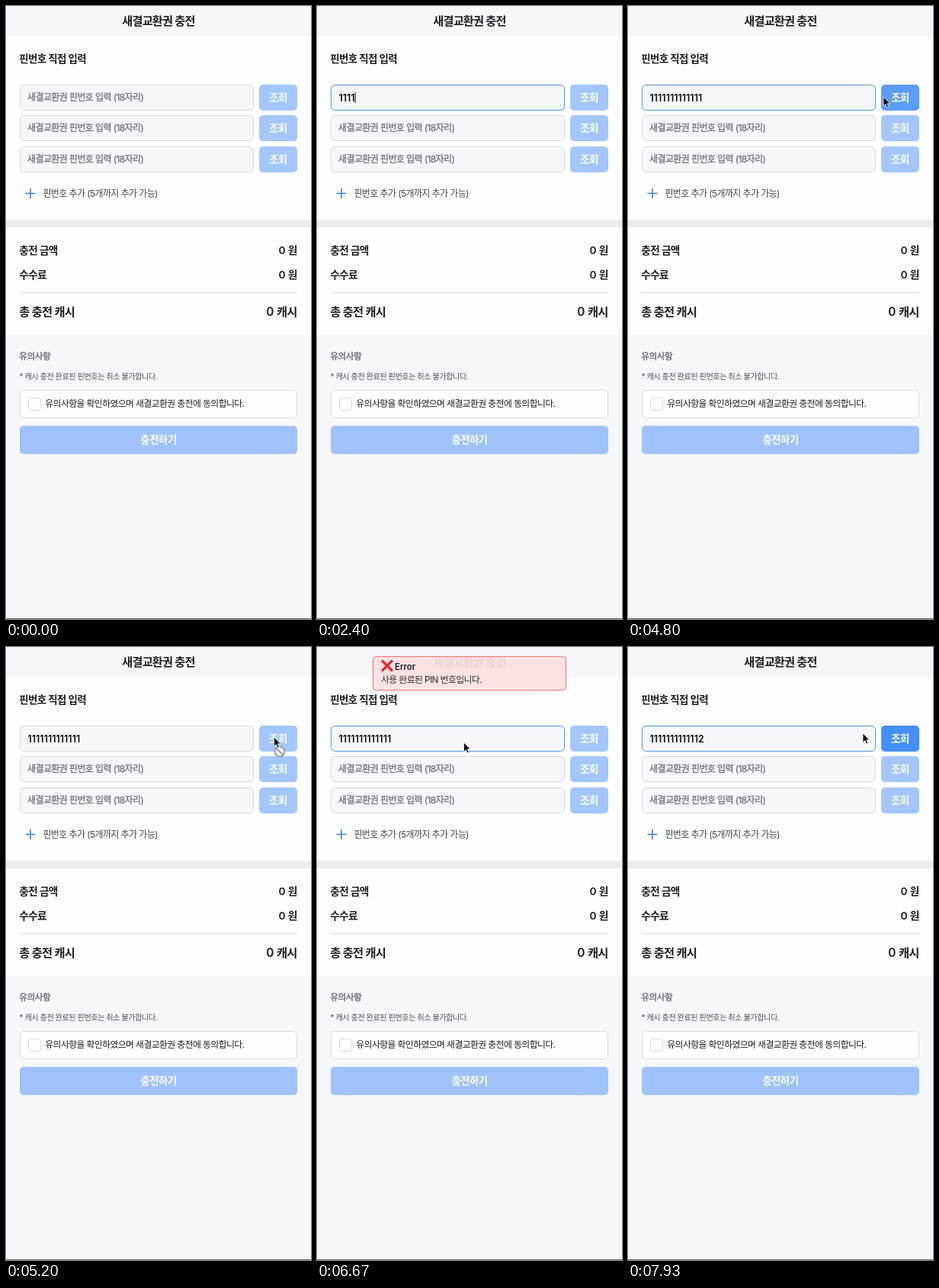
Recreate the animation shown at these times as an HTML page. Size 400x803 px, loop 8000 ms.

```html
<!DOCTYPE html>
<html lang="ko">
<head>
<meta charset="utf-8">
<title>교환권 충전</title>
<style>
  html, body { margin: 0; width: 100%; height: 100%; overflow: hidden; background: #f5f7fb; }
  svg { display: block; width: 100vw; height: 100vh; }
  text { font-family: Inter, "Noto Sans CJK KR", "Noto Sans CJK", sans-serif; letter-spacing: -.05em; white-space: pre; }
  .latin { letter-spacing: 0; }
  .amount { word-spacing: .09em; }
</style>
</head>
<body>
<svg id="stage" viewBox="0 0 400 803" preserveAspectRatio="none"></svg>
<script>
const LOOP = 8000;
const stage = document.getElementById('stage');
const VOUCHER = '새결교환권';
const INK = '#1d1f23', SOFT = '#70747b';
const BUTTON = { off: '#a3c6ff', on: '#448ffd', hover: '#5b9cfe' };
const BORDER = { idle: '#d6d9de', focus: '#4d97d3' };

function add(tag, attrs, parent = stage) {
  const node = document.createElementNS('http://www.w3.org/2000/svg', tag);
  for (const key in attrs) node.setAttribute(key, attrs[key]);
  parent.appendChild(node);
  return node;
}
const rect = (x, y, width, height, fill, more = {}, parent) =>
  add('rect', { x, y, width, height, fill, ...more }, parent);
const box = (x, y, w, h, fill, stroke, rx = 5, parent) =>
  rect(x + .5, y + .5, w - 1, h - 1, fill, { stroke, rx }, parent);

// Text placed by its vertical centre; a hairline stroke gives Hangul a medium weight.
function label(content, x, middle, size, weight = 400, fill = INK, anchor = 'start', parent) {
  const medium = weight === 500;
  const node = add('text', {
    x, y: middle + size * .37, fill, 'font-size': size, 'font-weight': medium ? 400 : weight,
    'text-anchor': anchor, stroke: fill, 'stroke-width': medium ? .3 : 0
  }, parent);
  node.textContent = content;
  return node;
}

// Page
rect(0, 0, 400, 803, '#f5f7fb');
rect(0, 40, 400, 240, '#fefdff');
rect(0, 280, 400, 10, '#ecedf0');
rect(0, 290, 400, 141, '#fefdff');
rect(0, 802, 400, 1, '#6d6f72');
label(`${VOUCHER} 충전`, 200, 19, 15.2, 600, INK, 'middle');
label('핀번호 직접 입력', 17.3, 69, 13.5, 600);

const rows = [103, 143, 184].map(y => {
  const field = box(18, y, 307, 34, '#f5f7fa', BORDER.idle);
  const hint = label(`${VOUCHER} 핀번호 입력 (18자리)`, 28, y + 17, 12, 500, SOFT);
  const button = rect(332, y, 50, 34, BUTTON.off, { rx: 5 });
  label('조회', 356.8, y + 17, 13.6, 600, '#fff', 'middle');
  return { field, hint, button };
});

add('path', { d: 'M25.5 245.5h13M32 239v13', stroke: '#3187e6', 'stroke-width': 1.6 });
label('핀번호 추가 (5개까지 추가 가능)', 48.4, 245.5, 12, 400, '#44474c');

[['충전 금액', '0 원', 319.5, 13.7], ['수수료', '0 원', 352, 13.7], ['총 충전 캐시', '0 캐시', 400.5, 15.3]]
  .forEach(([name, amount, y, size]) => {
    label(name, 17.3, y, size, 600);
    label(amount, 381.7, y, size, 600, INK, 'end').setAttribute('class', 'amount');
  });
rect(18, 375, 364, 1, '#dcdde1');

label('유의사항', 17.3, 459, 11.8, 500, '#63676d');
label('* 캐시 충전 완료된 핀번호는 취소 불가합니다.', 17.5, 485, 10.2, 400, '#4d5055');
box(18, 503, 364, 37, '#fefdff', '#d9dbe0');
box(29, 513, 17, 17, '#fefdff', '#d9d9e1', 3);
label(`유의사항을 확인하였으며 ${VOUCHER} 충전에 동의합니다.`, 51.3, 521, 11.85);
rect(18, 550, 364, 37, '#9fc2fd', { rx: 5 });
label('충전하기', 200, 568, 13.5, 600, '#fff', 'middle');

// Live parts
const pin = label('', 28.5, 120, 12.5, 600, '#111');
pin.setAttribute('class', 'latin');
const caret = rect(0, 113, 1, 14, '#111');

const toast = add('g', {});
box(73, 12, 254, 45, '#fee0e1', '#f2736f', 4, toast).setAttribute('fill-opacity', .93);
add('path', { d: 'M86 18.5L98 30.5M98 18.5L86 30.5', stroke: '#e8262d', 'stroke-width': 3.2, 'stroke-linecap': 'round' }, toast);
label('Error', 102, 25.3, 11.4, 600, INK, 'start', toast).setAttribute('class', 'latin');
label('사용 완료된 PIN 번호입니다.', 84, 42.2, 11.85, 400, '#2b2c30', 'start', toast);

const pointer = add('g', {});
const denied = add('g', { fill: '#eceef2', stroke: '#8d929b', 'stroke-width': 1.6 }, pointer);
add('circle', { cx: 7.5, cy: 19, r: 6.5 }, denied);
add('path', { d: 'M3 14.5l9 9' }, denied);
add('path', {
  d: 'M0 0V12.2L2.8 9.6L4.7 13.8L6.7 12.9L4.9 8.8H8.7Z',
  fill: '#000', stroke: '#fff', 'stroke-width': .8, 'stroke-linejoin': 'round'
}, pointer);

const TYPING = { from: 1720, step: 188, count: 13 };
const FOCUS = [[1070, 5200], [6450, LOOP]];
const TOAST = { in: 5200, shown: 5420, out: 7150, gone: 7350 };
const ERASE = 7180, RETYPE = 7430;
const SUBMIT = 5180;
// Pointer stops: time, x, y
const TRAVEL = [
  [[4370, 262, 126], [4640, 325, 121], [4800, 335, 119], [5060, 351.5, 118], [5900, 351.5, 118], [6350, 192.5, 125], [7180, 192.5, 125]],
  [[7600, 194, 124], [7930, 308, 113], [8000, 318, 112]]
];

const clamp = v => Math.min(1, Math.max(0, v));
const ease = v => v * v * (3 - 2 * v);
const show = (node, on) => node.setAttribute('visibility', on ? 'visible' : 'hidden');

function typedAt(t) {
  if (t >= RETYPE) return '1'.repeat(12) + '2';
  if (t >= ERASE) return '1'.repeat(12);
  const n = Math.floor((t - TYPING.from) / TYPING.step) + 1;
  return '1'.repeat(Math.min(TYPING.count, Math.max(0, n)));
}

function pointerAt(t) {
  const path = TRAVEL.find(p => t >= p[0][0] && t < p[p.length - 1][0]);
  if (!path) return null;
  const i = path.findIndex(stop => stop[0] > t);
  const [t0, x0, y0] = path[i - 1], [t1, x1, y1] = path[i];
  const k = ease((t - t0) / (t1 - t0));
  return [x0 + (x1 - x0) * k, y0 + (y1 - y0) * k];
}

function caretAt(t) {
  if (t >= 1070 && t < 4480) return true;
  return t >= ERASE && t < RETYPE + 300;
}

function render(t) {
  const value = typedAt(t), spot = pointerAt(t), row = rows[0];
  const focused = FOCUS.some(([a, b]) => t >= a && t < b);
  const enabled = value.length === 13 && (t < SUBMIT || t >= RETYPE);
  const over = spot && spot[0] > 331;

  pin.textContent = value;
  show(row.hint, !value);
  row.field.setAttribute('stroke', focused ? BORDER.focus : BORDER.idle);
  row.button.setAttribute('fill', !enabled ? BUTTON.off : over ? BUTTON.hover : BUTTON.on);
  show(caret, caretAt(t));
  caret.setAttribute('x', 28.5 + (value ? pin.getComputedTextLength() : 0));

  const slide = ease(clamp((t - TOAST.in) / (TOAST.shown - TOAST.in)));
  const fade = 1 - clamp((t - TOAST.out) / (TOAST.gone - TOAST.out));
  toast.setAttribute('transform', `translate(0 ${-40 * (1 - slide)})`);
  toast.setAttribute('opacity', slide * fade);

  pointer.setAttribute('display', spot ? 'inline' : 'none');
  if (spot) pointer.setAttribute('transform', `translate(${spot})`);
  denied.setAttribute('display', over && !enabled ? 'inline' : 'none');
}

const start = performance.now();
function tick() {
  render((performance.now() - start) % LOOP);
  requestAnimationFrame(tick);
}
tick();
</script>
</body>
</html>
```
